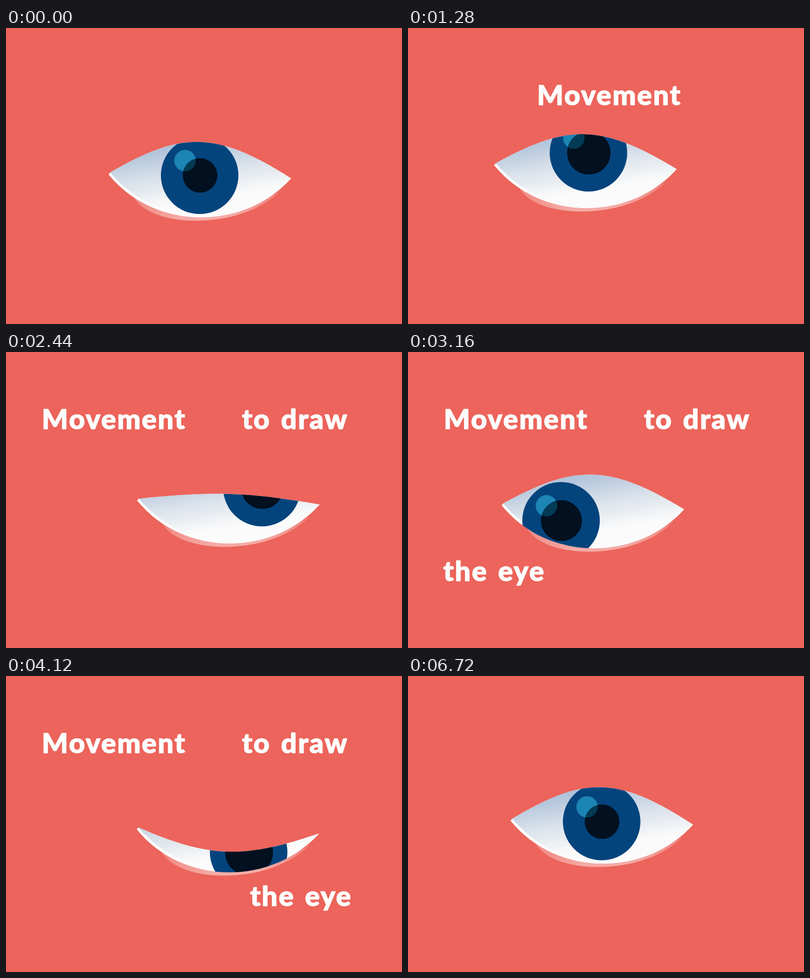
An HTML page with a canvas that plays this animation: 800 px wide and 600 px high, repeating every 6760 ms.

```html
<!DOCTYPE html>
<html lang="en">
<head>
<meta charset="utf-8">
<title>Movement to draw the eye</title>
<style>
html, body { margin: 0; width: 100%; height: 100%; overflow: hidden; background: #ec645b; }
canvas { display: block; }
</style>
</head>
<body>
<canvas id="stage" width="800" height="600"></canvas>
<script>
const ctx = document.getElementById('stage').getContext('2d');
const LOOP = 6760, CLEAR = 5720, STEP = 40;
const BACK = '#ec645b';
const LEAD = 250; // the gaze turns this long before the eye follows
const HOP = 14;   // height of the arc of each move

const clamp = u => Math.max(0, Math.min(1, u));
const smooth = u => u * u * (3 - 2 * u);
const progress = (t, start, length) => clamp((t - start) / length);

// Times below zero belong to the entrance; at zero the eye is open.
const rest = { x: 0, y: 0, lookX: 0, lookY: 0, pupil: 35 };
const moves = [
  { start: 1101, length: 450, x: -95, y: -13, lookX: 6.5, lookY: -27, pupil: 44 },
  { start: 1960, length: 585, x: 72, y: 14, lookX: 68, lookY: -28, pupil: 43 },
  { start: 2740, length: 420, x: -18, y: 14, lookX: -64, lookY: 29, pupil: 41.5 },
  { start: 3440, length: 600, x: 57, y: 14, lookX: 42, lookY: 44, pupil: 48.5 }
];
const blinks = [2288, 4038];

const glide = (key, t) => moves.reduce(
  (v, m) => v + (m[key] - v) * smooth(progress(t, m.start, m.length)), rest[key]);

const hop = t => HOP * moves.reduce(
  (sum, m) => sum + Math.sin(Math.PI * progress(t, m.start, m.length)), 0);

function bob(t) {
  const s = Math.max(t, -400);
  return 6.3 * Math.exp(-s / 800) * Math.sin(s * 2 * Math.PI / 450);
}

// 1 is shut, 0 open; the first opening springs past 0.
function closed(t) {
  const q = Math.max(0, t + 400) / 110;
  return blinks.reduce((sum, peak) => {
    const length = t < peak ? 170 : 250;
    return sum + 1 - smooth(clamp(Math.abs(t - peak) / length));
  }, Math.exp(-q) * Math.cos(q));
}

// Pulls back a little before shooting off.
const fling = u => smooth(u) * (1 - .3 * (1 - u)) - .13 * (1 - u) ** 2 * Math.sin(Math.PI * u);

const words = [
  { text: 'Movement', start: 650, x: 405.5, y: 156, go: 1380, length: 580, dx: -188.5, dy: 0 },
  { text: 'to draw', start: 1980, x: 583, y: 156, go: 0, length: 1, dx: 0, dy: 0 },
  { text: 'the eye', start: 2690, x: 173, y: 464, go: 3160, length: 900, dx: 422, dy: 2 }
];

function gradient(x0, y0, x1, y1, ...colors) {
  const g = ctx.createLinearGradient(x0, y0, x1, y1);
  colors.forEach((c, i) => g.addColorStop(i / (colors.length - 1), c));
  return g;
}
const shade = gradient(382, 231, 402, 350, '#adc1da', '#d9e1ea', '#fbfbfb');
const glow = gradient(258, 0, 556, 0, 'rgba(255,255,255,.25)', 'rgba(255,255,255,.46)',
  'rgba(255,255,255,.46)', 'rgba(255,255,255,.2)');

function disc(x, y, r, fill) {
  ctx.beginPath();
  ctx.arc(x, y, r, 0, 7);
  ctx.fillStyle = fill;
  ctx.fill();
}

function fillPath(d, fill) {
  ctx.fillStyle = fill;
  ctx.fill(new Path2D(d));
}

function drawEye(t) {
  const size = smooth(progress(t, -1040, 380));
  const lid = 213 + 192 * closed(t);
  ctx.save();
  ctx.translate(391.5 + glide('x', t), 305 + glide('y', t) - hop(t) + bob(t));
  ctx.scale(size, size);
  ctx.translate(-391.5, -305);
  fillPath('M258 343 C295 409 482 409 556 328 C480 385 320 385 258 343Z', glow);

  // Everything inside lies between the lower rim and the moving lid.
  const rim = 'M207 297 C300 411.7 480 411.7 576 305';
  ctx.clip(new Path2D(rim + 'L576 100 H207Z'));
  ctx.clip(new Path2D(`M207 297 L210.5 293 C355 ${lid} 425 ${lid} 576 305 V450 H207Z`));
  fillPath(rim + 'V100 H207Z', '#fcfcfc');
  fillPath('M210.5 293 C309 409 480 411.7 576 305 V100 H210.5Z', shade);

  const gaze = t + LEAD;
  const x = 391.2 + glide('lookX', gaze), y = 298.8 + glide('lookY', gaze);
  const relax = 10 * smooth(progress(t, 4120, 600));
  disc(x, y, 78.3, '#04447d');
  disc(x - 29.5, y - 30, 21.7, '#1c85b5');
  disc(x + .8, y, glide('pupil', gaze) - relax, '#02101f');
  ctx.clip();
  disc(x - 29.5, y - 30, 21.7, '#033a54');
  ctx.restore();
}

// Letters drop in from both ends of the word towards its middle.
function drawWord({ text, start, x, y, go, length, dx, dy }, t) {
  if (t < start) return;
  const f = fling(progress(t, go, length));
  const width = s => ctx.measureText(s).width;
  const left = x + dx * f - (width(text) - 2.4) / 2;
  [...text].forEach((letter, i) => {
    const p = progress(t, start + Math.min(i, text.length - 1 - i) * 45, 120);
    const at = [letter, left + width(text.slice(0, i + 1)) - width(letter), y + dy * f - 6 * (1 - p)];
    ctx.globalAlpha = p;
    ctx.fillText(...at);
    ctx.strokeText(...at);
  });
  ctx.globalAlpha = 1;
}

function frame(now) {
  const clock = Math.floor((now % LOOP) / STEP) * STEP;
  const t = clock >= CLEAR ? clock - LOOP : clock;
  ctx.fillStyle = BACK;
  ctx.fillRect(0, 0, 800, 600);
  drawEye(t);
  ctx.font = '800 56px Lato, "Open Sans", sans-serif';
  ctx.letterSpacing = '2.4px';
  ctx.wordSpacing = '5px';
  ctx.fillStyle = ctx.strokeStyle = '#fdfdfd';
  ctx.lineWidth = 1.5;
  ctx.lineJoin = 'round';
  words.forEach(word => drawWord(word, t));
  requestAnimationFrame(frame);
}
requestAnimationFrame(frame);
</script>
</body>
</html>
```
